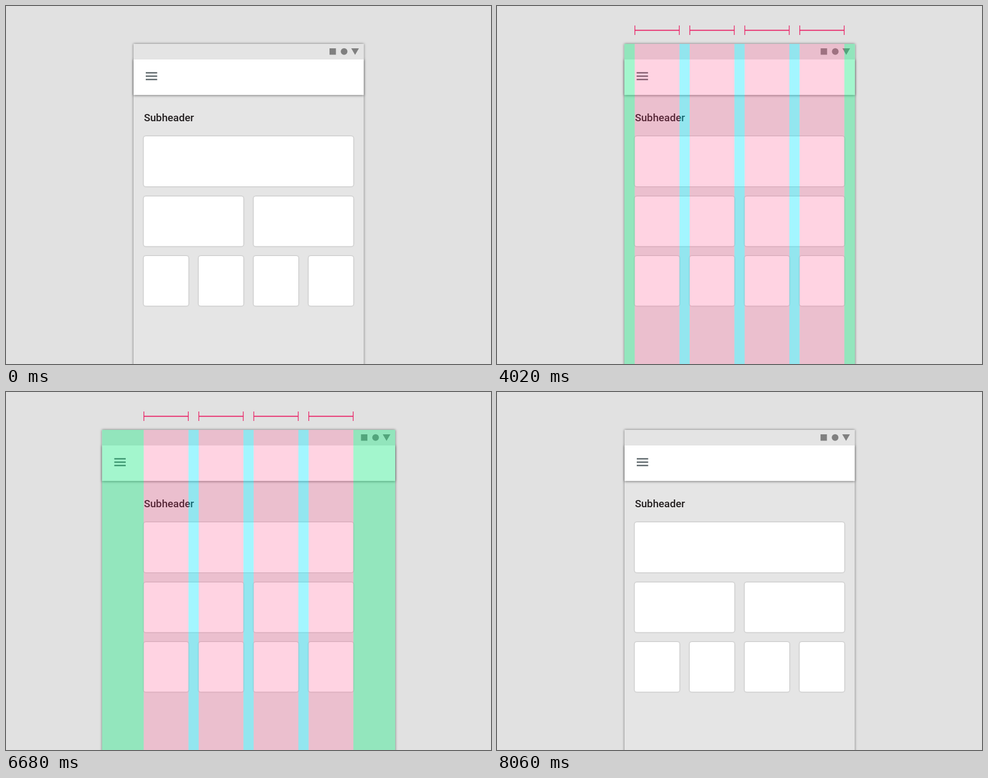
These frames come from a looping animation (871 by 643 pixels, 8.09 s). An HTML page:

```html
<!DOCTYPE html>
<html lang="en">
<head>
<meta charset="utf-8">
<title>Layout grid margins</title>
<style>
  html, body { margin: 0; width: 100%; height: 100%; overflow: hidden; background: #e1e1e1; }
  svg { display: block; width: 100%; height: 100%; }
  #frame { filter: drop-shadow(0 0 2px rgba(0, 0, 0, .52)); }
  #appBar { filter: drop-shadow(0 1.5px 2px rgba(0, 0, 0, .5)); }
  #cards { filter: drop-shadow(0 .8px 1.3px rgba(0, 0, 0, .36)); }
  text { font: 500 18.7px Roboto, Arial, sans-serif; fill: #231f20; }
</style>
</head>
<body>
<svg viewBox="0 0 871 643">
  <rect width="871" height="643" fill="#e1e1e1"/>
  <rect id="frame" y="68" height="620" fill="#e5e5e5"/>
  <rect id="appBar" y="95.5" height="64.3" fill="#fff"/>
  <rect id="statusBar" y="68" height="27.6" fill="#e4e4e4"/>
  <path id="menu" d="M251 120h20.5M251 126h20.5M251 132h20.5" stroke="#5e676b" stroke-width="2.3"/>
  <g id="status" fill="#808080">
    <rect x="581" y="76" width="11.5" height="11.5"/>
    <circle cx="607.2" cy="81.8" r="6"/>
    <path d="M620 76h13.8l-6.9 11.7z"/>
  </g>
  <text x="247.7" y="206.5">Subheader</text>
  <g id="cards" fill="#fff"></g>
  <g id="grid">
    <g id="columns" fill="#ff4081" fill-opacity=".23"></g>
    <g id="gutters" fill="#00e5ff" fill-opacity=".36"></g>
    <g fill="#00e676" fill-opacity=".36">
      <rect id="marginL" y="68" height="580"/>
      <rect id="marginR" y="68" height="580"/>
    </g>
    <g id="brackets" fill="none" stroke="#e91e63"></g>
  </g>
</svg>
<script>
  const LOOP = 8090;
  const START = 247.3, PITCH = 98.7, COL = 80.4, END = START + 3 * PITCH + COL;
  const LEFT = 229, RIGHT = 642.5, GROW = 56.8;
  const $ = id => document.getElementById(id);

  function add(parent, tag, attrs) {
    const el = document.createElementNS("http://www.w3.org/2000/svg", tag);
    for (const key in attrs) el.setAttribute(key, attrs[key]);
    $(parent).appendChild(el);
  }

  // One row of cards, each spanning the same number of columns
  function addRow(y, height, span) {
    for (let i = 0; i < 4; i += span) {
      add("cards", "rect", {
        x: START + i * PITCH, y, width: (span - 1) * PITCH + COL, height, rx: 4
      });
    }
  }

  addRow(234, 90, 4);
  addRow(342, 89.5, 2);
  addRow(449, 89.5, 1);

  for (let i = 0; i < 4; i++) {
    const x = START + i * PITCH, end = x + COL;
    add("columns", "rect", { x, y: 68, width: COL, height: 580 });
    if (i < 3) add("gutters", "rect", { x: end, y: 68, width: PITCH - COL, height: 580 });
    const a = x + 0.3, b = end - 0.3;
    add("brackets", "path", { d: `M${a} 35V52M${b} 35V52`, "stroke-width": 1.25 });
    add("brackets", "path", { d: `M${a} 43.7H${b}`, "stroke-width": 1.7 });
  }

  function ease(t, from, to) {
    const p = Math.min(1, Math.max(0, (t - from) / (to - from)));
    return (1 - Math.cos(Math.PI * p)) / 2;
  }

  function span(id, from, to) {
    $(id).setAttribute("x", from);
    $(id).setAttribute("width", to - from);
  }

  function draw(t) {
    const shift = GROW * (ease(t, 3990, 4680) - ease(t, 6650, 7340));
    const left = LEFT - shift, right = RIGHT + shift;
    for (const id of ["frame", "appBar", "statusBar"]) span(id, left, right);
    span("marginL", left, START);
    span("marginR", END, right);
    $("menu").setAttribute("transform", `translate(${-shift})`);
    $("status").setAttribute("transform", `translate(${shift})`);
    $("grid").setAttribute("opacity", ease(t, 970, 2000) - ease(t, 7430, 8060));
  }

  function tick() {
    draw(performance.now() % LOOP);
    requestAnimationFrame(tick);
  }
  tick();
</script>
</body>
</html>
```
